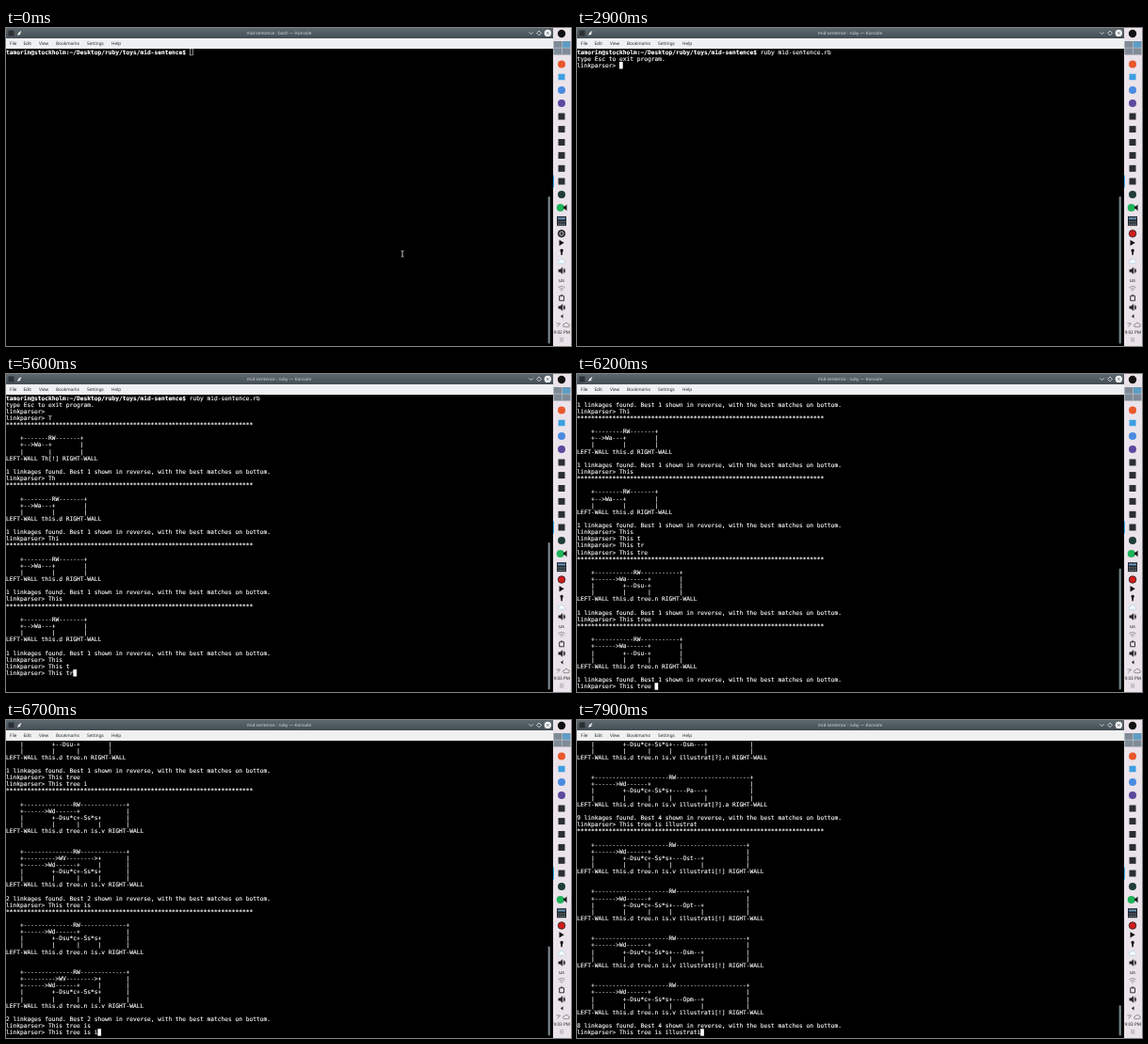
An HTML page for the animation above (8 s loop, 600x338 px).

```html
<!DOCTYPE html>
<html lang="en">
<head>
<meta charset="utf-8">
<title>Terminal</title>
<style>
html, body { margin: 0; width: 100%; height: 100%; overflow: hidden; background: #000; }
svg { position: absolute; left: 0; top: 0; font: 4.7px "Noto Sans", sans-serif; text-rendering: geometricPrecision; }
pre {
  position: absolute; left: 0; top: 22.4px; margin: 0;
  font: 20.093px/23px "DejaVu Sans Mono", monospace; color: #fff;
  -webkit-text-stroke: .4px #fff;
  transform: scale(.31); transform-origin: 0 0; text-rendering: geometricPrecision;
}
pre i { background: #fff; }
pre i.idle { background: none; outline: 2px solid #ddd; outline-offset: -2px; }
</style>
</head>
<body>
<svg width="600" height="338" viewBox="0 0 600 338">
  <defs>
    <linearGradient id="bar" x2="0" y2="1"><stop stop-color="#5d686f"/><stop offset="1" stop-color="#444d54"/></linearGradient>
    <path id="speaker" d="M-3.2-1.3h1.7L.8-3.4v6.8L-1.5 1.3h-1.7zM1.8-1.8Q3.3 0 1.8 1.8M2.6-2.8Q5 0 2.6 2.8" fill="#222" stroke="#222" stroke-width=".4"/>
  </defs>
  <rect width="581" height="11" fill="url(#bar)"/>
  <rect x="2.5" y="2.5" width="6" height="6" fill="#2b3035"/>
  <path d="M12.5 7.5l1.6-1.6M13.2 4.8l2 2M14 5.6l2-2" stroke="#fff" stroke-width="1.2"/>
  <text id="title" x="290" y="7.2" text-anchor="middle" fill="#d5dadd"></text>
  <path d="M555.3 4.4l2.2 2.2 2.2-2.2M566 3l2.4 2.4L566 7.8l-2.4-2.4z" fill="none" stroke="#fff" stroke-width=".7"/>
  <circle cx="575.3" cy="5.4" r="3.6" fill="#fff"/>
  <path d="M573.8 3.9l3 3m0-3l-3 3" stroke="#444d54" stroke-width=".7"/>
  <rect y="11" width="581" height="11" fill="#eff0f1"/>
  <g id="menu" fill="#232629"></g>
  <rect id="thumb" x="575.6" width="2.2" rx="1" fill="#77858b"/>

  <rect x="581" width="19" height="338" fill="#ebe3ea"/>
  <circle cx="590" cy="6" r="4.2" fill="#111"/>
  <rect x="581.5" y="14" width="18" height="14.5" fill="#7f8b97"/>
  <rect x="591" y="14.5" width="8" height="6.5" fill="#5d9dc6"/>
  <path d="M590.5 14v14.5M581.5 21.2h18" stroke="#c8cdd3" stroke-width=".6"/>
  <g id="icons"></g>
  <rect x="581" y="156.5" width="1" height="13" fill="#3daee9"/>
  <path d="M592 189.6h1.5l2-2.2v7l-2-2.2H592z" fill="#111"/>
  <rect x="585" y="200.2" width="10" height="10" fill="#20262d"/>
  <path d="M586 202.5h8" stroke="#6e9fc4" stroke-width="1.8"/>
  <path d="M586 206h8M586 208.5h8" stroke="#8a959f" stroke-width="1.2" stroke-dasharray="1.5 .7"/>
  <circle id="record" cx="590" cy="218.5" r="3.8" stroke="#222" stroke-width=".8"/>
  <circle id="ring" cx="590" cy="218.5" r="2" fill="none" stroke="#ccc" stroke-width=".8"/>
  <path d="M587.5 225.2l5.2 3.1-5.2 3.1z" fill="#111"/>
  <path d="M588.4 236.5a1.7 1.7 0 1 1 3.4 0l-.9 2.3v2.4h-1.6v-2.4z" fill="#111"/>
  <path d="M587.5 250.2a1.7 1.7 0 0 1 .4-3.3 2.4 2.4 0 0 1 4.6.3 1.6 1.6 0 0 1 .1 3z" fill="#f6fbfd" stroke="#9cc8dd" stroke-width=".6"/>
  <use href="#speaker" x="590" y="258"/>
  <text x="590" y="269.7" text-anchor="middle" font-size="5.4" fill="#222">us</text>
  <path d="M586.3 275.8q3.7-3 7.4 0M587.6 277.5q2.4-1.9 4.8 0M589 279.1q1-.8 2 0" fill="none" stroke="#777" stroke-width=".7"/>
  <path d="M587.7 284.8h4.8v5h-4.8zM589 284h2.2" fill="none" stroke="#222" stroke-width=".9"/>
  <use href="#speaker" x="590" y="297"/>
  <path d="M591.5 304.2v4.4l-2.6-2.2z" fill="#222"/>
  <path d="M584.5 314h4l-3 3.5M593 317.7a1.5 1.5 0 0 1 .2-3 2 2 0 0 1 3.8.2 1.4 1.4 0 0 1 0 2.8z" fill="none" stroke="#555" stroke-width=".6"/>
  <text id="clock" x="590.3" y="325" text-anchor="middle" fill="#222"></text>
  <path d="M588 329.7h4.2M588 331.4h4.2M588 333.1h4.2" stroke="#888" stroke-width=".6"/>

  <path id="mouse" d="M419.6 236.8q1.4 0 1.4.8 0-.8 1.4-.8M421 237.6v4.8M419.6 243.2q1.4 0 1.4-.8 0 .8 1.4.8" fill="none" stroke="#eee" stroke-width=".8"/>
</svg>
<pre id="term"></pre>
<script>
const $ = id => document.getElementById(id);
const ROWS = 44, LOOP = 8000, FOCUS = 500, ENTER = 2400, READY = 2600, MINUTE = 3700;
const SHELL = '<b>tamorin@stockholm:~/Desktop/ruby/toys/mid-sentence$</b> ';
const COMMAND = 'ruby mid-sentence.rb', PROMPT = 'linkparser> ';
const SENTENCE = 'This tree is illustrati';
const KEYS = [4500, 4700, 4900, 5100, 5300, 5400, 5600, 5800, 5900, 6100, 6300, 6400,
  6500, 6700, 6800, 7000, 7100, 7300, 7400, 7500, 7600, 7800, 7900];

// Dashes with a centred label; W links carry arrow heads
function dashes(n, label) {
  const left = Math.ceil((n - label.length) / 2);
  const out = [...'-'.repeat(left) + label + '-'.repeat(n - left - label.length)];
  if (label[0] == 'W') out[left - 1] = '>';
  if (label == 'WV') out[n - 1] = '>';
  return out;
}

// Each row is a list of links [label, from word, to word]
function diagram(middle, rows) {
  const words = ['LEFT-WALL', ...middle, 'RIGHT-WALL'];
  let at = 0;
  const mid = words.map(w => {
    const c = at + (w.length >> 1);
    at += w.length + 1;
    return c;
  });
  const open = new Set();
  const lines = [[['RW', 0, words.length - 1]], ...rows, []].map(links => {
    const out = Array(mid.at(-1) + 1).fill(' ');
    open.forEach(c => out[c] = '|');
    for (const [label, a, b] of links) {
      const from = mid[a], to = mid[b];
      out.splice(from, to - from + 1, '+', ...dashes(to - from - 1, label), '+');
      open.add(from).add(to);
    }
    return out.join('');
  });
  return [...lines, words.join(' ')];
}

const short = word => [1, [diagram([word], [[['Wa', 0, 1]]])]];

function clause(word, label, verb) {
  const words = ['this.d', 'tree.n', 'is.v'], low = [['Dsu*c', 1, 2], ['Ss*s', 2, 3]];
  if (word) {
    words.push(word);
    low.push([label, 3, 4]);
  }
  const rows = [[['Wd', 0, 2]], low];
  if (verb) rows.unshift([['WV', 0, 3]]);
  return diagram(words, rows);
}

// Result of parsing: [number found, diagrams], or nothing
function parse(text) {
  if (text == 'Th') return short('Th[!]');
  if (/^This? ?$/.test(text) && text.length > 2) return short('this.d');
  if (/^This tree ?$/.test(text))
    return [1, [diagram(['this.d', 'tree.n'], [[['Wa', 0, 2]], [['Dsu', 1, 2]]])]];
  if (/ is ?$/.test(text)) return [2, [clause(), clause('', '', true)]];
  const word = (text.match(/ is (il.*)/) || [])[1];
  if (!word) return;
  if (word == 'illus')
    return [4, [0, 1].flatMap(v => ['Ost', 'Osm'].map(l => clause('illus[!].a', l, v)))];
  if (word == 'illustrati')
    return [8, ['Ost', 'Opt', 'Osm', 'Opm'].map(l => clause(word + '[!]', l))];
  return [9, ['Ost', 'Opm', 'Osm', 'Pa'].map(l => clause(word + (l == 'Pa' ? '[?].a' : '[?].n'), l))];
}

function report(text) {
  const result = parse(text);
  if (!result) return [];
  const [found, list] = result;
  return ['*'.repeat(70), '', ...list.flatMap((d, i) => i ? ['', '', ...d] : d), '',
    `${found} linkages found. Best ${list.length} shown in reverse, with the best matches on bottom.`];
}

const entries = KEYS.map((time, i) => {
  const text = SENTENCE.slice(0, i + 1);
  return { time, lines: [...report(text), PROMPT + text] };
});

function screen(t) {
  const typed = t < 1000 ? 0 : Math.min(20, Math.floor(1 + 19 * (t - 1000) / 800));
  const lines = [SHELL + COMMAND.slice(0, typed)];
  if (t >= READY) lines.push('type Esc to exit program.', PROMPT);
  else if (t >= ENTER) lines.push('');
  for (const e of entries) if (t >= e.time) lines.push(...e.lines);
  return lines;
}

[['File', 4], ['Edit', 18.5], ['View', 35], ['Bookmarks', 53], ['Settings', 86], ['Help', 112]]
  .forEach(([s, x]) => $('menu').innerHTML += `<text x="${x}" y="18.3">${s}</text>`);

const dot = (y, fill, x = 590) => `<circle cx="${x}" cy="${y}" r="4" fill="${fill}"/>`;
const box = (y, fill, h = 7) => `<rect x="586.5" y="${y - h / 2}" width="7" height="${h}" fill="${fill}"/>`;
$('icons').innerHTML = dot(38.5, '#e8582c') + box(52, '#3d9fe0', 6.5) + dot(66, '#4a8be0') + dot(80, '#5b4a9e') +
  [94, 107.6, 121.5, 135.4, 149.3, 163].map(y => box(y, '#2a2e32')).join('') +
  dot(177, '#1f3d38') + dot(191, '#1fb35a', 588.7);

let last = -1;
function frame(now) {
  const t = Math.floor(now % LOOP / 100) * 100;
  if (t != last) {
    last = t;
    const lines = screen(t), active = t >= FOCUS;
    $('term').innerHTML = lines.slice(-ROWS).join('\n') + `<i class="${active ? '' : 'idle'}"> </i>`;
    const size = 313 * ROWS / (2 * ROWS + Math.max(0, lines.length - ROWS));
    $('thumb').setAttribute('y', 335.5 - size);
    $('thumb').setAttribute('height', size);
    $('title').textContent = `mid-sentence : ${t < ENTER ? 'bash' : 'ruby'} — Konsole`;
    $('clock').textContent = t < MINUTE ? '9:02 PM' : '9:03 PM';
    $('record').setAttribute('fill', active ? '#d01c1c' : '#333');
    $('ring').style.display = active ? 'none' : '';
    $('mouse').style.display = t < 1000 ? '' : 'none';
  }
  requestAnimationFrame(frame);
}
frame(performance.now());
</script>
</body>
</html>
```
